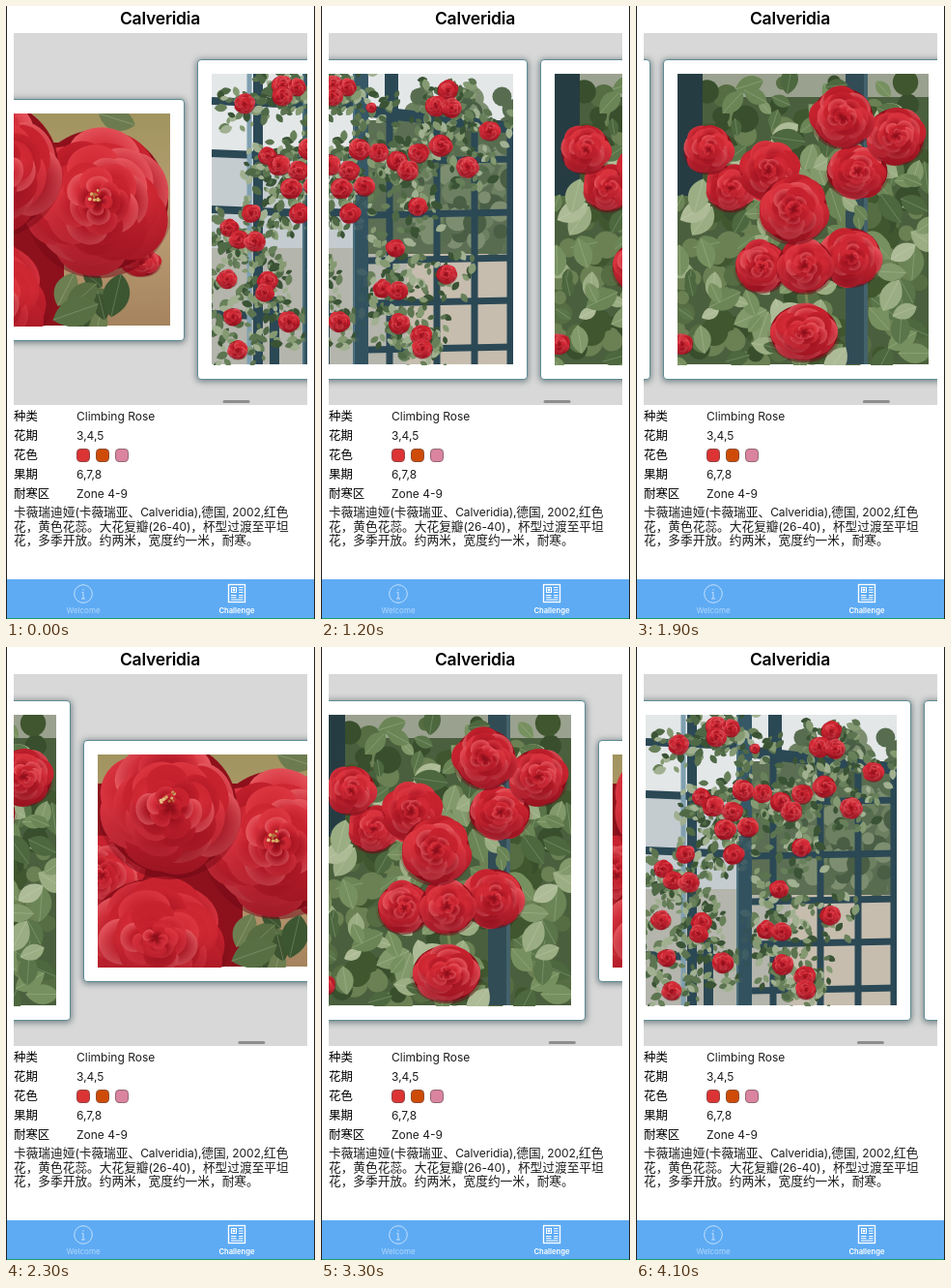
An HTML page with a canvas for the animation above (4200 ms loop, 320 px wide and 633 px high).

```html
<!DOCTYPE html>
<html lang="zh-CN">
<head>
<meta charset="utf-8">
<title>Climbing Rose</title>
<style>
html, body { margin: 0; width: 100%; height: 100%; overflow: hidden; background: #fff; }
body { font: 12px Inter, "Noto Sans CJK SC", "Noto Sans CJK JP", sans-serif; color: #1c1c1c; }
#stage { position: absolute; left: 0; top: 0; width: 320px; height: 633px; overflow: hidden; background: #fff; }
#stage::after { content: ""; position: absolute; inset: 0; border: solid #222; border-width: 0 1px; }
h1 { position: absolute; left: 0; top: 0; width: 319px; margin: 0; text-align: center; font-size: 17.5px; line-height: 25px; font-weight: 600; color: #000; letter-spacing: -.2px; }
#view { position: absolute; left: 8px; top: 28px; width: 304px; height: 384px; overflow: hidden; background: #d8d8d8; }
#strip { position: absolute; left: 0; top: 0; height: 384px; }
.card { position: absolute; box-sizing: border-box; width: 290px; padding: 14px; border: 1px solid #5f8b93; border-radius: 4px; background: #fff; box-shadow: 0 1px 6px 1px rgba(35, 60, 65, .55); }
.card canvas { display: block; }
#bar { position: absolute; left: 0; top: 379px; width: 28px; height: 2.5px; border-radius: 2px; background: #8d8d8d; }
dl { position: absolute; left: 8px; top: 414px; margin: 0; display: grid; grid-template-columns: 65px 200px; grid-auto-rows: 19.9px; align-items: center; line-height: 18px; }
dt { font-size: 12.4px; font-weight: 500; color: #000; }
dd { margin: 0; display: flex; gap: 6px; }
dd b { box-sizing: border-box; width: 14px; height: 14px; border: 1px solid rgba(90, 80, 80, .55); border-radius: 4.5px; }
p { position: absolute; left: 8px; top: 516px; margin: 0; font-size: 12.7px; line-height: 14.6px; white-space: nowrap; }
p span { font-size: 12px; letter-spacing: -.1px; }
nav { position: absolute; left: 0; top: 592px; width: 320px; height: 40px; background: #5eabf4; border-bottom: 1px solid #1a9f6a; }
nav text { font: 8px Inter, sans-serif; text-anchor: middle; }
</style>
</head>
<body>
<div id="stage">
  <h1>Calveridia</h1>
  <div id="view"><div id="strip"></div><div id="bar"></div></div>
  <dl>
    <dt>种类</dt><dd>Climbing Rose</dd>
    <dt>花期</dt><dd>3,4,5</dd>
    <dt>花色</dt><dd><b style="background:#dc3434"></b><b style="background:#cf4b08"></b><b style="background:#da84a0"></b></dd>
    <dt>果期</dt><dd>6,7,8</dd>
    <dt>耐寒区</dt><dd>Zone 4-9</dd>
  </dl>
  <p>卡薇瑞迪娅<span>(</span>卡薇瑞亚、<span>Calveridia),</span>德国<span>, 2002,</span>红色<br>花，黄色花蕊。大花复瓣<span>(26-40)</span>，杯型过渡至平坦<br>花，多季开放。约两米，宽度约一米，耐寒。</p>
  <nav>
    <svg width="320" height="40" fill="none" stroke="#c4e0fb">
      <circle cx="80" cy="15" r="9.3"/>
      <path d="M80 10v1.6M78.5 13.5H80V20M78 20h4"/>
      <g stroke="#fff">
        <rect x="230.500" y="5.500" width="17" height="18" stroke-width="1.300"/>
        <rect x="233.500" y="8.500" width="5" height="5"/>
        <circle cx="236" cy="11" r="1.400" fill="#fff" stroke="none"/>
        <path d="M241 8.500h4.500M241 11h4.500M241 13.500h4.500M233 16.500h5.500M241 16.500h4.500M233 18.700h5.500M241 18.700h4.500M233 21h12.500"/>
      </g>
      <text x="80" y="35" fill="#b4d8fa" stroke="none">Welcome</text>
      <text x="239" y="35" fill="#fff" stroke="none" style="font-weight:600;font-size:7.6px">Challenge</text>
    </svg>
  </nav>
</div>
<script>
const TAU = Math.PI * 2;
let seed = 1;
const rnd = (a = 0, b = 1) => {
  seed = (seed * 16807) % 2147483647;
  return a + (b - a) * seed / 2147483647;
};
const pick = list => list[Math.floor(rnd() * list.length)];

function rect(g, color, x, y, w, h) {
  g.fillStyle = color;
  g.fillRect(x, y, w, h);
}

function line(g, color, width, x1, y1, x2, y2) {
  g.strokeStyle = color;
  g.lineWidth = width;
  g.beginPath();
  g.moveTo(x1, y1);
  g.lineTo(x2, y2);
  g.stroke();
}

function blob(g, color, x, y, rx, ry = rx, turn = 0) {
  g.fillStyle = color;
  g.beginPath();
  g.ellipse(x, y, rx, ry, turn, 0, TAU);
  g.fill();
}

function leaf(g, color, x, y, len, turn = rnd(0, TAU)) {
  g.save();
  g.translate(x, y);
  g.rotate(turn);
  g.fillStyle = color;
  g.beginPath();
  g.moveTo(-len, 0);
  g.bezierCurveTo(-len * .5, -len * .8, len * .4, -len * .8, len, 0);
  g.bezierCurveTo(len * .4, len * .8, -len * .5, len * .8, -len, 0);
  g.fill();
  if (len > 8) line(g, "rgba(225,235,205,.25)", .8, -len, 0, len, 0);
  g.restore();
}

// Rings of overlapping petals, darker towards the heart and the underside.
function rose(g, x, y, r, flat = 1) {
  g.save();
  g.translate(x, y);
  g.scale(1, flat);
  blob(g, "#8e101b", 0, 0, r * .9);
  const rings = r > 40 ? 7 : r > 18 ? 5 : 3;
  for (let k = 0; k < rings; k++) {
    const size = r * (1 - k / (rings + .4));
    const n = 8 - Math.floor(k / 2), start = rnd(0, TAU);
    for (let i = 0; i < n; i++) {
      const a = start + i * TAU / n + rnd(-.3, .3), far = size * rnd(.5, .62);
      const px = Math.cos(a) * far, py = Math.sin(a) * far;
      const shade = g.createRadialGradient(px * .3, py * .3, 0, px, py, size * .5);
      shade.addColorStop(0, "#860b17");
      shade.addColorStop(.55, pick(["#b01825", "#c4202d", "#d32b37"]));
      shade.addColorStop(1, pick(["#c9242f", "#de3a44", "#ea6268"]));
      blob(g, shade, px, py, size * .47, size * rnd(.34, .42), a + Math.PI / 2);
    }
  }
  const under = g.createLinearGradient(0, -r, 0, r);
  under.addColorStop(.45, "rgba(110,5,20,0)");
  under.addColorStop(1, "rgba(110,5,20,.55)");
  blob(g, under, 0, 0, r * .98);
  g.restore();
}

const STEEL = "#2b4855";

function trellis(g) {
  seed = 77;
  rect(g, "#e3e7e8", 0, 0, 260, 300);
  rect(g, "#c4ccd0", 0, 80, 130, 100);
  rect(g, "#b4b5ac", 0, 180, 180, 120);
  rect(g, "#c6bdae", 150, 186, 110, 114);
  rect(g, "#5c6f54", 110, 48, 150, 138);
  for (let i = 0; i < 100; i++)
    blob(g, pick(["#586d50", "#6d8061", "#495e45", "#7d8e70"]), rnd(155, 260), rnd(22, 178), rnd(5, 13));
  for (const y of [28, 82, 140, 248]) line(g, STEEL, 8, 0, y, 96, y + 4);
  line(g, "#7fa0b0", 5, 39, 0, 39, 300);
  line(g, STEEL, 10, 48, 0, 48, 300);
  line(g, STEEL, 10, 65, 230, 65, 300);
  line(g, STEEL, 14, 134, 0, 134, 50);
  line(g, STEEL, 7, 132, 50, 132, 300);
  for (const x of [181, 220, 257]) line(g, STEEL, 7, x, 48, x, 300);
  for (const y of [88, 143, 190, 234, 282]) line(g, STEEL, 7, 110, y + 3, 260, y);
  line(g, STEEL, 12, 105, 38, 260, 56);
  line(g, "#365866", 16, 102, 0, 102, 300);
  line(g, "#4d717f", 2, 95, 0, 95, 300);

  const spots = [
    34,31, 73,12, 88,14, 73,23, 113,35, 192,17, 180,33, 196,35, 236,59, 185,74,
    213,96, 101,78, 121,81, 58,85, 70,94, 90,100, 106,116, 82,118, 140,90, 162,82,
    151,100, 161,137, 91,144, 41,144, 18,159, 28,171, 45,173, 138,180, 191,207, 16,212,
    58,214, 55,226, 125,222, 141,224, 22,251, 80,256, 142,258, 165,270, 166,284, 27,285];
  const greens = ["#4f6946", "#68805a", "#859a72", "#3a5335", "#a0b090", "#5c7450"];
  for (let k = 0; k < 27; k++)
    for (let i = 0; i < spots.length; i += 2)
      leaf(g, pick(greens), spots[i] + rnd(-27, 27), spots[i + 1] + rnd(-20, 27), rnd(3, 7));
  line(g, "rgba(50,82,96,.85)", 13, 103, 125, 103, 300);
  for (let i = 0; i < spots.length; i += 2)
    rose(g, spots[i], spots[i + 1], i === 8 ? 6 : rnd(10, 13), .94);
}

function bunch(g) {
  seed = 1234;
  rect(g, "#4a5f3d", 0, 0, 260, 300);
  rect(g, "#9aa18f", 26, 0, 234, 24);
  const greens = ["#6b8556", "#82996b", "#9bad83", "#4d673f", "#adbb97", "#5a7549", "#77905f"];
  for (let i = 0; i < 220; i++)
    blob(g, pick(["#40562f", "#566c42", "#6b8053", "#384e2c"]), rnd(0, 260), rnd(8, 300), rnd(6, 15));
  rect(g, "#263c43", 0, 0, 26, 126);
  rect(g, "#314c55", 174, 0, 23, 300);
  rect(g, "#44626b", 193, 0, 4, 300);
  for (let i = 0; i < 170; i++) {
    const x = rnd(0, 260), y = rnd(5, 300);
    const onPost = x > 165 && x < 206 && y > 195 || x < 34 && y < 90;
    if (!onPost) leaf(g, pick(greens), x, y, rnd(9, 19));
  }
  line(g, "#788954", 3, 120, 130, 140, 280);
  const roses = [
    5,279,12, 55,118,27, 32,78,28, 95,100,33, 186,101,35, 226,64,33,
    171,45,35, 180,189,34, 87,199,30, 132,198,32, 120,140,39, 131,267,39];
  for (let i = 0; i < roses.length; i += 3)
    rose(g, roses[i], roses[i + 1], roses[i + 2], i === 12 || i === 33 ? .82 : .96);
}

function closeup(g) {
  seed = 4321;
  const soil = g.createLinearGradient(0, 0, 0, 219);
  soil.addColorStop(0, "#a0945f");
  soil.addColorStop(.5, "#bb9f75");
  soil.addColorStop(1, "#a5835e");
  rect(g, soil, 0, 0, 260, 219);
  rect(g, "#8c111c", 0, 30, 150, 189);
  for (let i = 0; i < 12; i++) leaf(g, pick(["#586d42", "#3d5330", "#6d7e50"]), rnd(150, 215), rnd(168, 219), rnd(12, 22));
  leaf(g, "#6d7c50", 205, 6, 20, .3);
  rose(g, 230, 154, 22, .7);
  rose(g, 4, 125, 48);
  rose(g, 60, 190, 80, .86);
  rose(g, 186, 90, 80, 1.02);
  rose(g, 75, 55, 77, .98);
  leaf(g, "#3d5632", 204, 188, 23, 1.8);
  leaf(g, "#586f44", 162, 205, 25, 2.8);
  for (const [x, y] of [[73, 45], [182, 84]])
    for (let i = 0; i < 12; i++) blob(g, pick(["#d8ad68", "#e5bd83", "#b46c3c"]), x + rnd(-8, 8), y + rnd(-6, 6), rnd(1, 2));
}

const strip = document.getElementById("strip");
const bar = document.getElementById("bar");
const PITCH = 303;

[closeup, trellis, bunch, closeup].forEach((paint, i) => {
  const wide = paint === closeup;
  const card = document.createElement("div");
  const pic = document.createElement("canvas");
  card.className = "card";
  card.style.left = i * PITCH + "px";
  card.style.top = (wide ? 68 : 27) + "px";
  pic.width = 260;
  pic.height = wide ? 220 : 301;
  paint(pic.getContext("2d"));
  card.append(pic);
  strip.append(card);
});

// Each swipe: start time, start offset, resting offset, decay time.
const swipes = [
  [0, -105, -288, 150],
  [1110, -288, -591, 251],
  [1900, -578, -894, 252],
  [2740, -882, -591, 250],
  [3410, -611, -288, 250]
];

function offset(t) {
  const [start, from, to, decay] = swipes.findLast(s => s[0] <= t);
  return to + (from - to) * Math.exp((start - t) / decay);
}

function draw() {
  const t = Math.floor(performance.now() % 4200 / 100) * 100;
  const x = offset(t);
  strip.style.transform = `translateX(${Math.round(x) - 8}px)`;
  bar.style.transform = `translateX(${216.5 - (x + 105) * .0219}px)`;
  requestAnimationFrame(draw);
}
draw();
</script>
</body>
</html>
```
